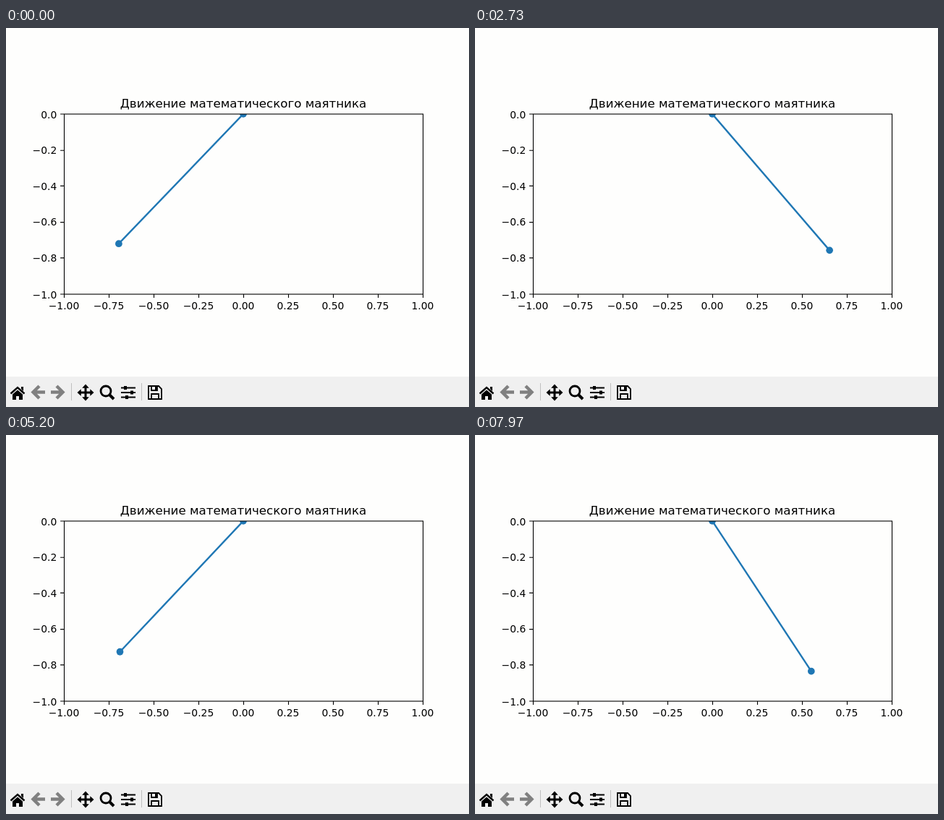
These frames come from a looping animation (640 px wide and 524 px high, 8000 ms). An HTML page:

```html
<!DOCTYPE html>
<html lang="ru">
<head>
<meta charset="utf-8">
<style>
  html, body { margin: 0; width: 100%; height: 100%; overflow: hidden; background: #fefefd; }
  svg { display: block; width: 640px; height: 524px; }
  text { font-family: "DejaVu Sans", sans-serif; font-size: 13.89px; }
  .title { font-size: 16.67px; }
  .axes { fill: none; stroke: #000; stroke-width: 1.1; }
  .pendulum { stroke: #1f77b4; fill: #1f77b4; stroke-width: 2.4; }
  .pendulum circle { stroke: none; }
  .icon { fill: none; stroke: #000; stroke-width: 2.4; }
  .solid { fill: #000; stroke: none; }
  .disabled { stroke: #808080; stroke-width: 4.4; }
  .separator { stroke: #c0c0c0; stroke-width: 1; }
</style>
</head>
<body>
<svg viewBox="0 0 640 524">
  <defs><clipPath id="plot"><rect x="80" y="118.4" width="496" height="248"/></clipPath></defs>
  <!-- a 640 by 480 figure, slightly stretched to the window -->
  <g transform="scale(1 1.0042)">
    <text class="title" x="328" y="110" text-anchor="middle">Движение математического маятника</text>
    <g id="labels"></g>
    <g clip-path="url(#plot)">
      <g class="pendulum">
        <line id="rod" x1="328" y1="118.4"/>
        <circle cx="328" cy="118.4" r="4.86"/>
        <circle id="bob" r="4.86"/>
      </g>
    </g>
    <path class="axes" id="ticks"/>
    <rect class="axes" x="80.5" y="118.5" width="496" height="248"/>
  </g>

  <rect y="482" width="640" height="42" fill="#f0f0f0"/>
  <path class="separator" d="M90.5 491V515M187.5 491V515"/>
  <!-- home -->
  <path class="icon" d="M6.5 505.5 16 497 25.5 505.5"/>
  <path class="solid" d="M21 496h3v6l-3-3zM9 506.5l7-6 7 6V514h-5v-5h-4v5H9z"/>
  <!-- back, forward -->
  <path class="icon disabled" d="M46 495 37.5 503.5 46 512M38 503.5H54"/>
  <path class="icon disabled" d="M70 495 78.5 503.5 70 512M78 503.5H62"/>
  <!-- pan -->
  <path class="icon" style="stroke-width:3" d="M110 496V512M102 504H118"/>
  <path class="solid" d="M110 492.5l4.8 5.2h-9.6zM110 515.5l4.8-5.2h-9.6zM98.5 504l5.2-4.8v9.6zM121.5 504l-5.2-4.8v9.6z"/>
  <!-- zoom -->
  <circle class="icon" cx="138" cy="502" r="7" style="stroke-width:2.8"/>
  <path class="icon" style="stroke-width:4" d="M143 507 149 513"/>
  <!-- subplots -->
  <path class="icon" style="stroke-width:1.8" d="M159 497.5H179M159 504H179M159 510.5H179"/>
  <path class="solid" d="M163 495h4v5h-4zM172 501.5h4v5h-4zM165 508h4v5h-4z"/>
  <!-- save -->
  <path class="icon" style="stroke-width:1.8" d="M197 495H211L215 499V513H197zM201 513V506H211V513"/>
  <path class="icon" style="stroke-width:1.8" d="M201 495V501H209V495"/>
  <path class="solid" d="M206 495h3v6h-3z"/>
</svg>
<script>
  const LOOP = 8000, FPS = 30;
  const AMPLITUDE = Math.PI / 4, LENGTH = 248;
  const PIVOT = { x: 328, y: 118.4 };
  const RESTART = 2.3;

  // [seconds, swing phase]; the simulation starts over at RESTART
  const firstRun = [[0, 2.925], [1.967, 4.773], [RESTART, 5.093]];
  const secondRun = [[RESTART, 0], [3.467, 1.17], [4.467, 2.174],
                     [6, 3.644], [6.8, 4.397], [7.967, 5.552]];

  const $ = id => document.getElementById(id);

  function addLabel(value, digits, x, y, anchor) {
    const label = document.createElementNS("http://www.w3.org/2000/svg", "text");
    label.setAttribute("x", x);
    label.setAttribute("y", y);
    label.setAttribute("text-anchor", anchor);
    label.textContent = value.toFixed(digits).replace("-", "\u2212");
    $("labels").append(label);
  }

  function drawAxes() {
    let ticks = "";
    for (let i = 0; i <= 8; i++) {
      const x = 80 + 62 * i;
      ticks += `M${x + 0.5} 366.5v4.9`;
      addLabel(-1 + i / 4, 2, x, 387, "middle");
    }
    for (let i = 0; i <= 5; i++) {
      const y = PIVOT.y + LENGTH * i / 5;
      ticks += `M80 ${Math.floor(y) + 0.5}h-4.9`;
      addLabel(i ? -i / 5 : 0, 1, 70.3, Math.round(y + 5.2), "end");
    }
    $("ticks").setAttribute("d", ticks);
  }

  function phaseAt(time) {
    const run = time < RESTART ? firstRun : secondRun;
    let i = 1;
    while (i < run.length - 1 && time > run[i][0]) i++;
    const [t0, p0] = run[i - 1], [t1, p1] = run[i];
    return p0 + (p1 - p0) * (time - t0) / (t1 - t0);
  }

  function render(now) {
    const time = Math.floor((now % LOOP + 7) * FPS / 1000) / FPS;
    const angle = AMPLITUDE * Math.cos(phaseAt(time));
    const x = PIVOT.x + LENGTH * Math.sin(angle);
    const y = PIVOT.y + LENGTH * Math.cos(angle);
    $("rod").setAttribute("x2", x);
    $("rod").setAttribute("y2", y);
    $("bob").setAttribute("cx", x);
    $("bob").setAttribute("cy", y);
  }

  drawAxes();
  const start = performance.now();
  function tick() {
    render(performance.now() - start);
    requestAnimationFrame(tick);
  }
  tick();
</script>
</body>
</html>
```
